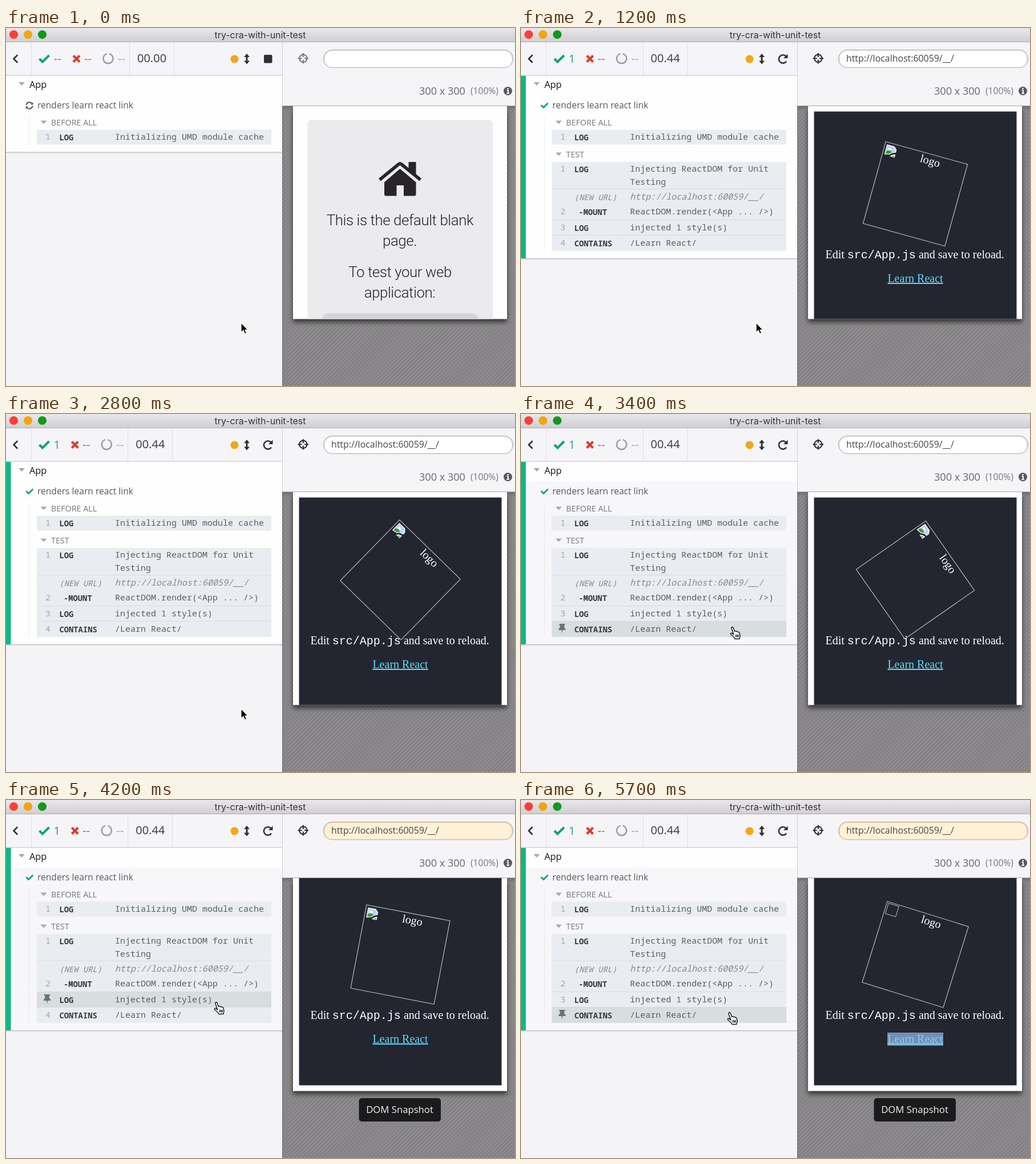
An HTML page for the animation above (5.8 s loop, 892 by 628 pixels).

```html
<!DOCTYPE html>
<html lang="en">
<head>
<meta charset="utf-8">
<title>Unit test runner</title>
<style>
html, body { margin: 0; width: 100%; height: 100%; overflow: hidden; background: #f4f3f6; }
svg { display: block; width: 892px; height: 628px; font: 15.6px "Open Sans", sans-serif; }
text { white-space: pre; }
.mono { font: 15px "Noto Sans Mono", monospace; fill: #5c5e62; }
.cmd { font: 600 13.8px "Noto Sans Mono", monospace; fill: #37393d; }
.num { font: 15px "Noto Sans Mono", monospace; fill: #a3a7ad; }
.new { font-style: italic; fill: #85888f; }
.cmd.new { font-weight: 500; }
.head { font-size: 14.3px; fill: #77787d; }
.stat { font-size: 20px; }
.blank { font: 300 25.8px Roboto, sans-serif; letter-spacing: -.4px; fill: #252225; text-anchor: middle; }
.page { font: 20px "Liberation Serif", serif; fill: #fff; }
.line { fill: none; stroke-linecap: round; stroke-linejoin: round; }
</style>
</head>
<body>
<svg viewBox="0 0 892 628">
  <defs>
    <linearGradient id="bar" x2="0" y2="1"><stop stop-color="#e9e7e9"/><stop offset="1" stop-color="#d0ced0"/></linearGradient>
    <linearGradient id="shade" x2="0" y2="1"><stop stop-opacity=".2"/><stop offset="1" stop-opacity="0"/></linearGradient>
    <pattern id="stripes" width="5" height="5" patternUnits="userSpaceOnUse" patternTransform="rotate(45)">
      <rect width="5" height="5" fill="#8d8b8d"/><rect width="2" height="5" fill="#807e80"/>
    </pattern>
    <filter id="soft" x="-10%" y="-10%" width="120%" height="120%"><feGaussianBlur stdDeviation="4"/></filter>
    <clipPath id="view"><rect x="503" y="137" width="375" height="373.500"/></clipPath>
    <clipPath id="pill"><rect x="557" y="39" width="331" height="30" rx="15"/></clipPath>
    <clipPath id="list"><rect id="listBox" y="84" width="484"/></clipPath>
  </defs>

  <!-- command list -->
  <rect width="484" height="628" fill="#f4f3f6"/>
  <g id="edge">
    <rect y="-2" width="484" height="4" fill="#d6d5d9"/>
    <rect y="-1" width="484" height="1.6" fill="#b5b4b8"/>
  </g>
  <g clip-path="url(#list)">
    <rect y="84" width="484" height="330" fill="#fefefe"/>
    <rect id="hoverPane" y="118.500" width="484" height="300" fill="#f7f6f9"/>
    <rect x="54" y="178.500" width="411" height="26" fill="#e9edf1"/>
    <path d="M22 95H33L27.500 101ZM60.500 162.500H71.500L66 168.500Z" fill="#a9a9ad"/>
    <path d="M41 155V205" stroke="#c6c7cb" stroke-dasharray="1 2"/>
    <g id="test">
      <path d="M41 205V390" stroke="#c6c7cb" stroke-dasharray="1 2"/>
      <rect x="54" y="235" width="411" height="156" fill="#e9edf1"/>
      <rect id="hoverRow" x="54" width="411" height="27" fill="#d8dde0"/>
      <path d="M54 282.500H465M54 336.500H465M54 363.500H465" stroke="#d6dce1"/>
      <path d="M60.500 218.500H71.500L66 224.500Z" fill="#a9a9ad"/>
      <text class="head" x="79" y="227">TEST</text>
    </g>
    <rect id="passBar" y="84" width="8.500" height="330" fill="#0fb784"/>
    <text x="41" y="105" font-size="16.300" font-weight="500" fill="#111">App</text>
    <text x="55" y="141" fill="#57585d">renders learn react link</text>
    <g id="sync" class="line" stroke="#5d5e63" stroke-width="2.200">
      <path d="M-5.500 -1.500A5.700 5.700 0 0 1 4.600 -3.300M5.500 1.500A5.700 5.700 0 0 1 -4.600 3.300"/>
      <path d="M6.500 -6V-1.500H2ZM-6.500 6V1.500H-2Z" fill="#5d5e63" stroke="none"/>
    </g>
    <path id="tick" class="line" d="M36 136L39.500 139.500L46.500 132.500" stroke="#0fa678" stroke-width="3"/>
    <text class="head" x="79" y="171">BEFORE ALL</text>
    <g id="rows"></g>
    <path id="pin" d="M-5 -8H5V-5.500H3.500L4 -1Q6.500 .5 6.500 3H1L0 9L-1 3H-6.500Q-6.500 .5 -4 -1L-3.500 -5.500H-5Z" fill="#6c7176"/>
  </g>

  <!-- runner toolbar -->
  <rect y="25" width="484" height="58" fill="#f5f4f7"/>
  <path d="M0 83.300H484" stroke="#d3d2d6" stroke-width="1.500"/>
  <path d="M44.500 25V83" stroke="#dddce0"/>
  <path class="line" d="M19.500 48L13.500 54L19.500 60" stroke="#303035" stroke-width="2.600"/>
  <path d="M58.500 54L64 59.500L75.500 48" fill="none" stroke="#0fa07a" stroke-width="4"/>
  <text id="passed" class="stat" x="83.500" y="60.500" fill="#16a57f"></text>
  <g id="stats">
    <path d="M118 48.500L129 59.500M129 48.500L118 59.500" stroke="#e0382d" stroke-width="4"/>
    <text class="stat" x="137" y="60.500" fill="#e0463c">--</text>
    <path class="line" d="M182 45.500A8.600 8.600 0 1 1 176 45.500" stroke="#9b9ba0" stroke-width="2.400"/>
    <text class="stat" x="196" y="60.500" fill="#a3a3a8">--</text>
    <path d="M216.500 25V83M294.500 25V83" stroke="#dddce0"/>
    <text id="timer" class="stat" x="230" y="60" fill="#38383d"></text>
  </g>
  <circle cx="400.500" cy="54.500" r="7" fill="#f5a517"/>
  <path d="M422 45L427 51H423.500V57.500H427L422 63.500L417 57.500H420.500V51H417Z" fill="#303035"/>
  <rect id="stop" x="452" y="47" width="14.500" height="14.500" rx="2" fill="#303035"/>
  <g id="reload">
    <path d="M465 58.500A7.200 7.200 0 1 1 464.300 49.500" fill="none" stroke="#303035" stroke-width="2.600"/>
    <path d="M467.500 45.500V53H460Z" fill="#303035"/>
  </g>

  <!-- preview -->
  <rect x="484" y="25" width="408" height="112" fill="#f5f4f7"/>
  <rect x="484" y="136.500" width="408" height="492" fill="url(#stripes)"/>
  <rect x="484" y="136.500" width="408" height="8" fill="url(#shade)"/>
  <path d="M484.500 25V137" stroke="#d0cfd3"/>
  <path d="M484.500 137V628" stroke="#69676a"/>
  <g id="target" fill="none" stroke-width="2">
    <circle cx="520.800" cy="53.300" r="6.700"/>
    <path d="M520.800 44V51M520.800 55.500V62.600M511.500 53.300H518.500M523 53.300H530"/>
  </g>
  <rect id="urlBox" x="556.500" y="38.500" width="332" height="31" rx="15.500" stroke-width="1.400"/>
  <g clip-path="url(#pill)"><rect x="556" y="37" width="333" height="36" rx="16" fill="none" stroke="#000" stroke-opacity=".1" stroke-width="6"/></g>
  <text id="url" x="570" y="59" font-size="15.900" fill="#45464a">http://localhost:60059/__/</text>
  <text x="724" y="116.500" font-size="18.100" fill="#66676b">300 x 300</text>
  <text x="814" y="116" fill="#77787c">(100%)</text>
  <circle cx="879.500" cy="110.500" r="7.500" fill="#57575c"/>
  <path d="M878 106.500H881M877.500 109.500H880V114M877 114.500H882" stroke="#f5f4f7" stroke-width="2" fill="none"/>

  <rect x="503" y="144" width="375" height="372" fill="#000" opacity=".6" filter="url(#soft)"/>
  <rect x="503" y="137" width="375" height="373.500" fill="#fefefe"/>
  <g clip-path="url(#view)">
    <g id="blank">
      <rect x="528.500" y="161" width="324.500" height="380" rx="7" fill="#ebeaec"/>
      <g fill="#282528">
        <path d="M705.500 235H718.500V261L705.500 250Z"/>
        <path d="M690.500 247L718.500 270.500V291.500Q718.500 294.500 715.500 294.500H697V276H684.500V294.500H666Q663 294.500 663 291.500V270.500Z"/>
        <path d="M653 264L686.500 236.500Q690.500 233.500 694.500 236.500L728 264L724.500 268.500L690.500 240.800L656.500 268.500Z"/>
      </g>
      <text class="blank" x="690.500" y="346">This is the default blank</text>
      <text class="blank" x="690" y="382">page.</text>
      <text class="blank" x="690.500" y="437">To test your web</text>
      <text class="blank" x="690" y="473">application:</text>
      <rect x="553.500" y="500.500" width="275" height="40" rx="12" fill="#d5d4d6"/>
    </g>
    <g id="app">
      <rect x="513.500" y="146.500" width="355" height="374" fill="#23262f"/>
      <text class="page" x="533.500" y="403.500">Edit <tspan font-family="Liberation Mono, monospace">src/App.js</tspan> and save to reload.</text>
      <rect id="mark" x="642" y="428" width="98" height="23" fill="#7090b4"/>
      <text id="link" class="page" x="691" y="446" text-anchor="middle" text-decoration="underline">Learn React</text>
      <g id="logo">
        <rect x="-74.400" y="-74.400" width="148.800" height="148.800" fill="none" stroke="#c3c4c7" stroke-width="1.100"/>
        <text class="page" x="9.600" y="-56.300" text-anchor="middle">logo</text>
        <g transform="translate(-72 -72.500)">
          <rect id="noIcon" x=".5" y=".5" width="19" height="19" fill="none" stroke="#b9babd"/>
          <g id="icon">
            <path d="M1 2H15L20 7V12L14 14L10 18L1 20Z" fill="#f3f4f6"/>
            <path d="M2.500 3.500H14L18.500 8V11L12 14L9 17L2.500 18Z" fill="#bcd3f3"/>
            <path d="M5 9Q6 6 8.500 7.500Q11 7 11 10H5Z" fill="#fff"/>
            <path d="M2.500 18V14Q8 9 13 13L9 17Z" fill="#3f9a35"/>
            <path d="M20 15V21H11L15 17Z" fill="#f3f4f6"/>
            <path d="M18.500 17.500V20H14Z" fill="#3f9a35"/>
          </g>
        </g>
      </g>
    </g>
  </g>
  <g id="label">
    <rect x="618.500" y="523" width="143.500" height="41" rx="5" fill="#1b1b1d"/>
    <text x="690" y="548.500" font-size="16.700" fill="#f6f6f6" text-anchor="middle">DOM Snapshot</text>
  </g>

  <!-- window bar -->
  <rect width="892" height="24.500" fill="url(#bar)"/>
  <path d="M0 24.500H892" stroke="#aeacae"/>
  <circle cx="13.500" cy="11.500" r="7.600" fill="#fb3f38"/>
  <circle cx="38.500" cy="11.500" r="7.600" fill="#f3a40f"/>
  <circle cx="63.500" cy="11.500" r="7.600" fill="#12981f"/>
  <text x="445.500" y="17.500" font-size="15.900" fill="#363437" text-anchor="middle" style="font-family:Inter,sans-serif">try-cra-with-unit-test</text>

  <path id="arrow" d="M0 0V17L4 13.500L6.500 19.500L9.500 18.200L7 12.500H12Z" stroke="#fff" stroke-width="1.200"/>
  <path id="hand" class="line" style="fill:#fff" stroke="#111" stroke-width="1.400"
    d="M6 12L3 3Q2.600 1 4.200 .8Q5.700 .8 6.300 2.600L8.300 8.300Q10.300 6.800 11.300 8.800Q13.300 7.500 14.300 9.700Q16.500 9 17 11.500L17.800 15Q18 18 16.800 21.500H9Q7.500 18.500 2 14Q.5 12 2.300 11.300Q4 11 6.800 14ZM10.500 14.500V18M12.800 14.500V18M15 14.500V18"/>
</svg>
<script>
const $ = id => document.getElementById(id);
const show = (id, on) => $(id).style.display = on ? '' : 'none';
const move = (id, x, y, turn = 0) => $(id).setAttribute('transform', `translate(${x} ${y}) rotate(${turn})`);

// baseline, number, command, message, style
const rows = [
  [196, 1, 'LOG', 'Initializing UMD module cache'],
  [252, 1, 'LOG', 'Injecting ReactDOM for Unit'],
  [275, '', '', 'Testing'],
  [301, '', '(NEW URL)', 'http://localhost:60059/__/', 'new'],
  [327, 2, '-MOUNT', 'ReactDOM.render(&lt;App ... /&gt;)'],
  [355, 3, 'LOG', 'injected 1 style(s)'],
  [382, 4, 'CONTAINS', '/Learn React/'],
];
$('rows').innerHTML = rows.map(([y, n, cmd, msg, style = '']) => `
  <text class="num" id="n${y}" x="69" y="${y}">${n}</text>
  <text class="cmd ${style}" x="${cmd[0] === '-' ? 101 : 93.5}" y="${y + 1}">${cmd}</text>
  <text class="mono ${style}" x="191" y="${y}">${msg}</text>`).join('');

// time, x, y of the pointer
const path = [
  [0, 412, 517], [3000, 412, 517], [3300, 366, 375], [3400, 366, 373],
  [3600, 364, 355], [4200, 364, 354], [4500, 364, 355], [4700, 361, 371], [5800, 361, 372],
];
function pointer(t) {
  const i = path.findIndex(p => p[0] > t);
  const [t0, x0, y0] = path[i - 1], [t1, x1, y1] = path[i];
  const u = (t - t0) / (t1 - t0), k = u * u * (3 - 2 * u);
  return [x0 + (x1 - x0) * k, y0 + (y1 - y0) * k];
}

function draw(t) {
  const loaded = t >= 200, mounted = t >= 400, done = t >= 500;
  const snap = t >= 3700, marked = t >= 4800;

  const bottom = done ? 404 : mounted ? 348 : loaded ? 295 : 217.5;
  $('listBox').setAttribute('height', bottom - 84);
  move('edge', 0, bottom);
  show('test', loaded);
  show('passBar', done);
  show('tick', done);
  show('sync', !done);
  move('sync', 41, 136, t * .18);

  $('passed').textContent = done ? '1' : '--';
  $('timer').textContent = done ? '00.44' : mounted ? '00.34' : loaded ? '00.14' : '00.00';
  move('stats', done ? -2.7 : 0, 0);
  show('stop', !done);
  show('reload', done);
  $('target').setAttribute('stroke', done ? '#29292d' : '#77777c');

  const peek = t >= 3600;
  show('url', loaded);
  show('label', peek);
  $('urlBox').setAttribute('fill', peek ? '#fff1d6' : '#fff');
  $('urlBox').setAttribute('stroke', peek ? '#c9bfa9' : '#c0bfc4');

  show('blank', !loaded);
  show('app', mounted);
  move('app', 0, snap ? -20 : 0);
  const start = marked ? 4740 : snap ? 3600 : 340;
  move('logo', 691, 291, (t - start) * .018);
  $('link').style.fill = marked ? '#88cdee' : '#61dafb';
  show('mark', marked);
  show('noIcon', marked);
  show('icon', !marked);

  const [x, y] = pointer(t), over = y < 391;
  show('arrow', !over);
  show('hand', over);
  move(over ? 'hand' : 'arrow', x, y);
  show('hoverPane', y < 404);
  const last = y >= 364;
  show('hoverRow', over);
  show('pin', over);
  $('hoverRow').setAttribute('y', last ? 364 : 336.5);
  move('pin', 72, last ? 376 : 349);
  show('n355', !over || last);
  show('n382', !over || !last);
}

function tick(now) {
  draw(Math.floor(now % 5800 / 100) * 100);
  requestAnimationFrame(tick);
}
tick(performance.now());
</script>
</body>
</html>
```
